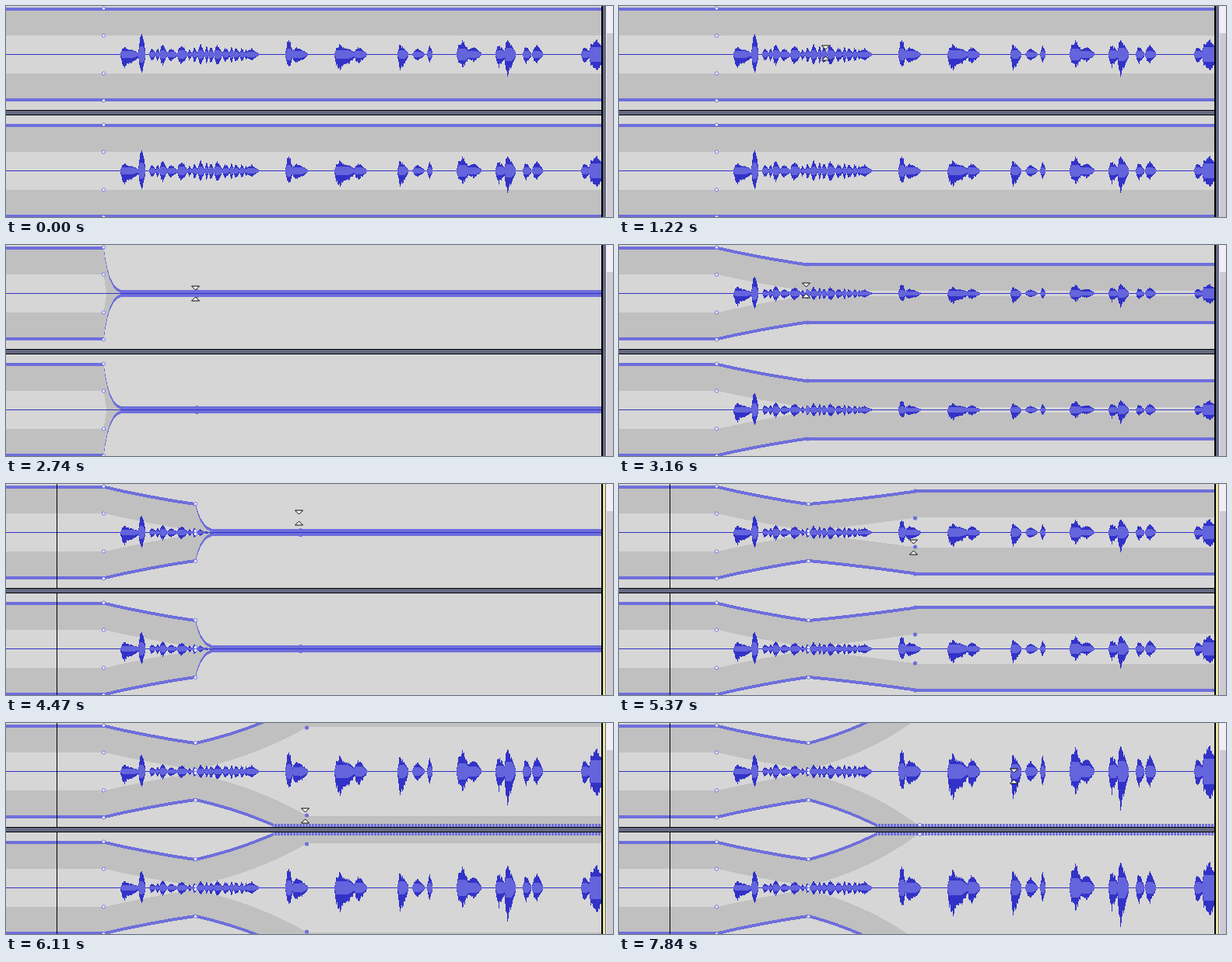
Animation of 780x272 px, one loop 8 s. Source, as an HTML page with a canvas:

```html
<!DOCTYPE html>
<html lang="en">
<head>
<meta charset="utf-8">
<title>Envelope editing</title>
<style>
html, body { margin: 0; width: 100%; height: 100%; overflow: hidden; background: #d6d6d6; }
canvas { display: block; }
</style>
</head>
<body>
<canvas id="stage" width="780" height="272"></canvas>
<script>
const ctx = document.getElementById('stage').getContext('2d');
const LOOP = 8000, RIGHT = 765, FULL = 59.4, GAP = 35, LIMIT = 69, TINY = 6e-6;
const LIGHT = '#d6d6d6', SHADE = '#c0c0c0', LINE = '#6e6edc', PEAK = '#3232c8', RMS = '#6464dc';

let seed = 7;
function rand() {
  seed = (seed * 16807) % 2147483647;
  return seed / 2147483647;
}

const up = new Float32Array(RIGHT), down = new Float32Array(RIGHT), core = new Float32Array(RIGHT);

// One syllable: a body with a peak, which sits early when the lower half is taller
function burst(a, b, u, d) {
  const w = b - a, peak = a + w * (0.12 + 0.3 * Math.min(1, u / d) ** 2);
  for (let x = a; x < Math.min(b, RIGHT); x++) {
    const ends = Math.min(1, (x - a + 1) / 3) * Math.min(1, (b - x) / (0.4 * w)) ** 0.7;
    const p = ends * (0.55 + 0.45 * Math.exp(-Math.abs(x - peak) / 3));
    up[x] = Math.max(up[x], u * p * (0.85 + 0.3 * rand()));
    down[x] = Math.max(down[x], d * p * (0.85 + 0.3 * rand()));
    core[x] = Math.max(core[x], Math.min(u, d) * ends * 0.42);
  }
}

// Main syllables: start, end, height above and below the axis
[
  [147,172,9,17], [170,179,28,24], [359,369,18,16], [367,388,9,11],
  [422,450,12,20], [447,464,9,11], [503,517,12,19], [522,538,7,7], [541,548,10,9],
  [579,597,17,16], [593,611,10,9], [629,643,11,15], [640,655,18,25],
  [664,675,9,11], [676,690,11,10], [739,751,9,10], [749,774,21,23]
].forEach(b => burst(...b));

// Murmur between the first words
for (let x = 184; x < 316;) {
  const w = 5 + Math.floor(rand() * 9), h = 5 + rand() * 7;
  burst(x, x + w, h, h + 1);
  x += w;
}
burst(308, 325, 7, 7);

// Pointer moves: start, end, target x, target y
const moves = [
  [100,180,380,126], [340,410,369,142], [560,940,272,60], [1090,1710,247,59],
  [1900,1900,245,59], [1980,2150,245,72], [2600,2740,243,62], [2910,3160,240,58],
  [3580,3680,241,58.6], [3920,4330,376,65], [4470,4470,376,43], [4640,4710,376,37],
  [5370,5370,378,81], [5450,5670,381,93], [5820,6110,384,119], [6270,6650,384,133],
  [7290,7510,543,46], [7620,7840,507,68]
];

// The picture refreshes about every 100 ms while the pointer moves
function pointer(t) {
  let x = 424, y = 160;
  for (const [a, b, tx, ty] of moves) {
    if (t < a) break;
    const n = 1 + Math.round((b - a) / 100);
    const k = t >= b ? 1 : (1 + Math.floor((t - a) / (b - a) * (n - 1))) / n;
    x += (tx - x) * k;
    y += (ty - y) * k;
  }
  return { x, y };
}

// A point follows the pointer until release; crossing the axis silences it
function grabbed(t, from, to, side) {
  const { x, y } = pointer(Math.min(t, to - 1)), reach = side * (y - 61.5);
  return { x: x + 2, y: reach > 0 ? reach + GAP - 1 : TINY, held: t < to, from };
}

function envelope(points, x) {
  if (x <= points[0].x) return points[0].y;
  for (let i = 1; i < points.length; i++) {
    const a = points[i - 1], b = points[i];
    if (x < b.x) return a.y * (b.y / a.y) ** ((x - a.x) / (b.x - a.x));
  }
  return points[points.length - 1].y;
}

function box(color, x, y, w, h) {
  ctx.fillStyle = color;
  ctx.fillRect(x, y, w, h);
}

function column(color, x, c, a, b) {
  box(color, x, c - a, 1, a + b + 1);
}

function dot(x, y, held) {
  ctx.beginPath();
  ctx.arc(x + 0.5, y, held ? 2.6 : 2.1, 0, 7);
  ctx.fillStyle = held ? LINE : '#fff';
  ctx.fill();
  if (held) return;
  ctx.lineWidth = 1;
  ctx.strokeStyle = LINE;
  ctx.stroke();
}

function track(c, top, bottom, points) {
  ctx.save();
  ctx.beginPath();
  ctx.rect(0, top, RIGHT, bottom - top);
  ctx.clip();
  box(LIGHT, 0, top, RIGHT, bottom - top);
  for (let x = 0; x < RIGHT; x++) {
    const v = envelope(points, x), h = Math.max(3, Math.round(v)), g = v / FULL;
    column(SHADE, x, c, h, h);
    if (h > GAP) column(LIGHT, x, c, h - GAP, h - GAP);
    const edge = Math.min(h, LIMIT + 1);
    if (h <= LIMIT || x % 4) {
      box(LINE, x, c - edge - 1, 1, 4);
      box(LINE, x, c + edge - 2, 1, 4);
    }
    box(PEAK, x, c, 1, 1);
    const u = up[x] * g, d = down[x] * g, r = Math.round(core[x] * g);
    if (u + d > 0.8) {
      column(PEAK, x, c, Math.round(u), Math.round(d));
      column(RMS, x, c, r, r);
    }
  }
  for (const p of points) {
    const outer = Math.max(3, p.y), inner = p.y - GAP;
    for (const s of [-1, 1]) {
      if (outer < 70) dot(p.x, c + 0.5 + s * outer, p.held);
      if (inner > 0) dot(p.x, c + 0.5 + s * Math.min(LIMIT, inner), p.held);
    }
  }
  ctx.restore();
}

function drawPointer({ x, y }) {
  ctx.fillStyle = '#fff';
  ctx.strokeStyle = '#000';
  ctx.lineWidth = 1;
  x = Math.round(x) + 0.5;
  y = Math.round(y) + 0.5;
  for (const s of [-1, 1]) {
    ctx.beginPath();
    ctx.moveTo(x - 5, y + s * 9.5);
    ctx.lineTo(x + 5, y + s * 9.5);
    ctx.lineTo(x, y + s * 4.5);
    ctx.closePath();
    ctx.fill();
    ctx.stroke();
  }
}

function draw(t) {
  const focused = t >= 3920;
  const points = [
    { x: 125, y: FULL, from: 0 },
    grabbed(t, 1900, 3920, -1),
    grabbed(t, 4330, 6960, 1)
  ].filter(p => t >= p.from);

  track(62, 0, 134, points);
  track(212, 141, 272, points);
  if (focused) box('#000', 65, 0, 1, 272);

  box('#000', 0, 134, 768, 7);
  box('#666a82', 0, 135, 768, 5);
  box('#000', 765, 0, 2, 272);
  box('#666a82', 767, 0, 4, 272);
  if (focused) box('#e6e6a0', 767, 0, 3, 272);
  box('#f0eef4', 771, 0, 9, 272);
  box('#cdcad2', 772, 35, 8, 237);

  if (t >= 100) drawPointer(pointer(t));
}

const start = performance.now();
function frame() {
  draw((performance.now() - start) % LOOP);
  requestAnimationFrame(frame);
}
frame();
</script>
</body>
</html>
```
